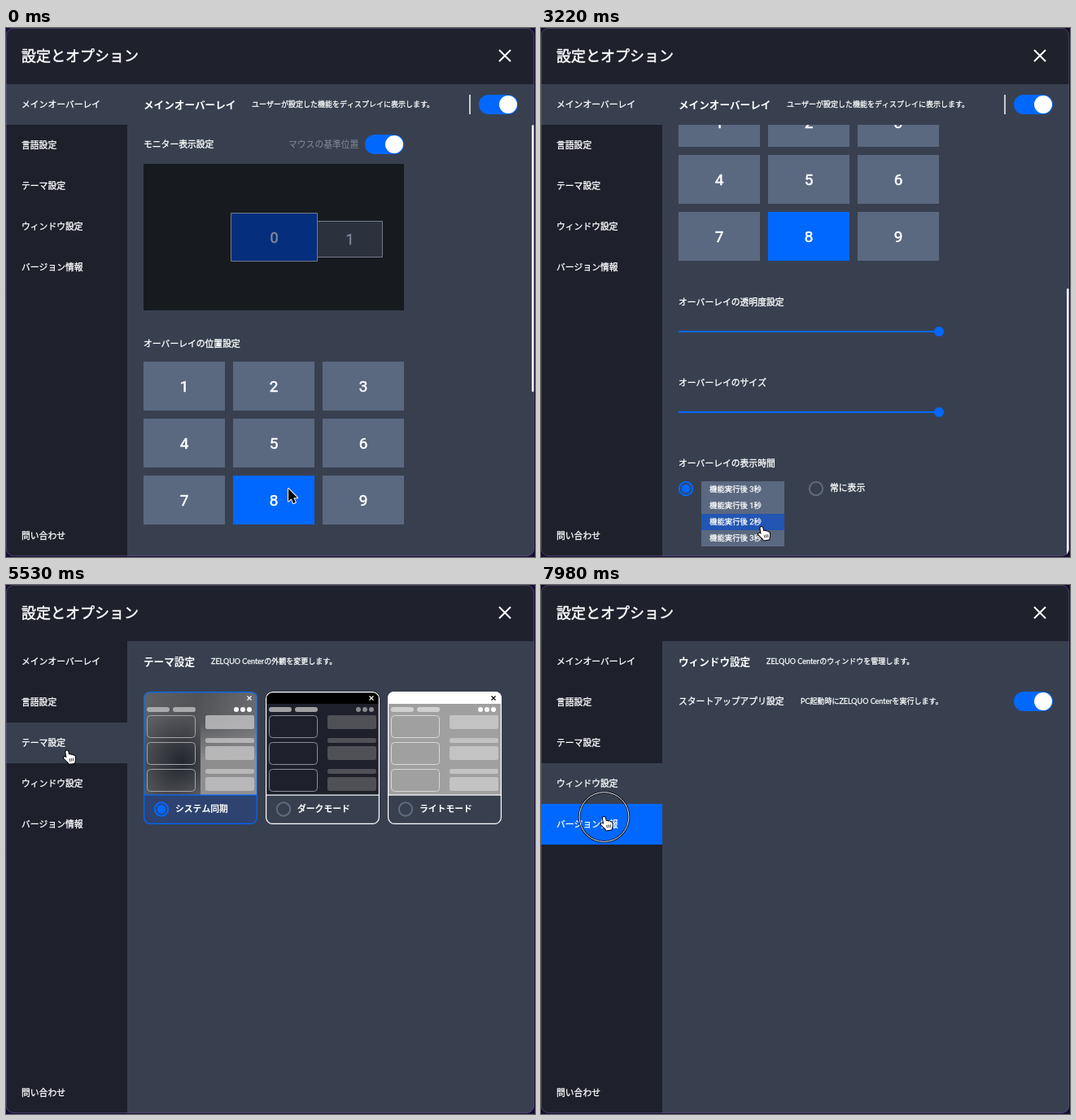
Animation, 650 px wide and 650 px high, one loop 8 s. Source, as an HTML page with a canvas:

```html
<!DOCTYPE html>
<html lang="ja">
<head>
<meta charset="utf-8">
<title>設定とオプション</title>
<style>
html, body { margin: 0; width: 100%; height: 100%; overflow: hidden; background: #190c34; }
canvas { display: block; width: 650px; height: 650px; }
</style>
</head>
<body>
<canvas id="stage" width="650" height="650"></canvas>
<script>
const ctx = document.getElementById('stage').getContext('2d');
const LOOP = 8000, APP = 'ZELQUO Center';
const BLUE = '#0068ff', PANEL = '#384050', SIDE = '#1e202c', TILE = '#5a6980', WHITE = '#fff';
const CJK = '"Noto Sans CJK JP", "Noto Sans CJK", sans-serif';
const MENU = ['メインオーバーレイ', '言語設定', 'テーマ設定', 'ウィンドウ設定', 'バージョン情報'];
const OPTIONS = [3, 1, 2, 3].map(n => `機能実行後 ${n}秒`);

// Cursor moves: start, end, x, y
const MOVES = [
  [70, 210, 364, 500], [890, 1130, 283, 566], [2520, 3080, 271, 613],
  [3230, 3700, 88, 155], [4620, 4830, 75, 201], [5500, 5700, 73, 238], [6980, 7250, 77.5, 285]
];
// Mouse button: down, up
const PRESSES = [[1330, 1450], [3850, 3990], [5180, 5320], [6720, 6860], [7770, 8000]];
// Menu hover: item, enter, leave
const HOVERS = [[1, 3540, 4745], [2, 4745, 5560], [3, 5560, 7080], [4, 7080, 9000]];
const PAGE_TIMES = [4120, 5380, 6900];

const ARROW = new Path2D('M0 0V15.5L3.6 12.3L6.2 18L8.8 16.8L6.3 11.3H11Z');
const HAND = new Path2D('M-1.6 1.3C-1 -.4 1 -.3 1.4 1.2L2.5 5.3C3.4 4.3 4.9 4.6 5.2 5.7C6.2 4.9 7.5 5.3 7.8 6.4' +
  'C8.8 5.9 9.8 6.5 10 7.8C10.4 10.6 10 12.4 9.2 15.6L2.8 16.4C1.5 13.9 -1.5 12 -3.8 9.3C-4.3 7.7 -2.3 7.2 -.4 8.9Z');
const FINGERS = new Path2D('M3.2 9.8L4 13.5M5.4 9.5L6 13.2M7.6 9.2L8 12.8');

const clamp = v => Math.max(0, Math.min(1, v));
const span = (t, a, b) => clamp((t - a) / (b - a));
const ease = p => p * p * (3 - 2 * p);

// A hairline outline gives regular text a medium weight.
function text(s, x, y, size = 10.8, { color = WHITE, bold = false, medium = !bold, face = 'Roboto', align = 'left' } = {}) {
  ctx.font = `${bold ? 700 : 400} ${size}px ${face}, ${CJK}`;
  ctx.fillStyle = ctx.strokeStyle = color;
  ctx.textAlign = align;
  ctx.fillText(s, x, y + size * 0.37);
  if (medium) {
    ctx.lineWidth = size * 0.028;
    ctx.lineJoin = 'round';
    ctx.strokeText(s, x, y + size * 0.37);
  }
}

function rect(x, y, w, h, color) {
  ctx.fillStyle = color;
  ctx.fillRect(x, y, w, h);
}

function paint(fill, stroke, lw) {
  if (fill) { ctx.fillStyle = fill; ctx.fill(); }
  if (stroke) { ctx.strokeStyle = stroke; ctx.lineWidth = lw; ctx.stroke(); }
}

function round(x, y, w, h, r, fill, stroke, lw = 1) {
  ctx.beginPath();
  ctx.roundRect(x, y, w, h, r);
  paint(fill, stroke, lw);
}

function circle(x, y, r, fill, stroke, lw = 1) {
  ctx.beginPath();
  ctx.arc(x, y, r, 0, 7);
  paint(fill, stroke, lw);
}

function cross(x, y, r, color, lw) {
  ctx.beginPath();
  ctx.moveTo(x - r, y - r); ctx.lineTo(x + r, y + r);
  ctx.moveTo(x + r, y - r); ctx.lineTo(x - r, y + r);
  paint(null, color, lw);
}

function toggle(x, y) {
  round(x, y, 48, 24, 12, BLUE);
  circle(x + 36, y + 12, 11, WHITE);
}

function radio(x, y, on) {
  circle(x, y, 8.2, null, on ? BLUE : '#5d6b7c', 2);
  if (on) circle(x, y, 5.6, BLUE);
}

function slider(y) {
  rect(169, y - 1, 320, 2, BLUE);
  circle(489, y, 6, BLUE);
}

function heading(title, desc, x) {
  text(title, 169, 94, 12.6, { bold: true });
  if (desc) text(desc, x, 94, 9, { face: 'Lato' });
}

function cursorAt(t) {
  let x = 347, y = 566;
  for (const [a, b, nx, ny] of MOVES) {
    const p = ease(span(t, a, b));
    x += (nx - x) * p;
    y += (ny - y) * p;
  }
  return { x, y };
}

function monitor(x, y, w, h, fill, label) {
  rect(x, y, w, h, fill);
  ctx.strokeStyle = '#747b87';
  ctx.lineWidth = 1;
  ctx.strokeRect(x + 0.5, y + 0.5, w - 1, h - 1);
  text(label, x + w / 2, y + h / 2, 18, { color: '#80879a', align: 'center' });
}

function dropdown(t, y, mouse) {
  const open = ease(span(t, 1400, 1650)) - ease(span(t, 3920, 4160));
  ctx.save();
  ctx.beginPath();
  ctx.rect(197, y, 102, 20 + 60 * open);
  ctx.clip();
  rect(197, y, 102, 80, TILE);
  const row = Math.floor((mouse.y - 557) / 20);
  if (open > 0.9 && row > 0 && row < 4 && mouse.x > 197 && mouse.x < 299) rect(197, y + 20 * row, 102, 20, '#2255b4');
  OPTIONS.forEach((s, i) => text(s, 207, y + 10 + 20 * i, 9.4));
  ctx.restore();
  if (t < 1400 || t > 3920) {
    ctx.beginPath();
    ctx.moveTo(277, y + 7); ctx.lineTo(289, y + 7); ctx.lineTo(283, y + 13.5);
    paint(WHITE);
  }
}

function overlayPage(t, mouse) {
  const p = ease(span(t, 320, 560));
  ctx.save();
  ctx.beginPath();
  ctx.rect(149, 119, 500, 530);
  ctx.clip();
  ctx.translate(0, -324 * p);
  text('モニター表示設定', 169, 143);
  text('マウスの基準位置', 347, 143, 10.8, { color: '#858b96', medium: false });
  toggle(441, 131);
  rect(169, 167, 320, 180, '#171b20');
  monitor(276, 227, 107, 60, '#052e7d', '0');
  monitor(382, 237, 81, 45, '#2b313d', '1');
  text('オーバーレイの位置設定', 169, 388);
  for (let i = 0; i < 9; i++) {
    const x = 169 + 110 * (i % 3), y = 410 + 70 * Math.floor(i / 3);
    rect(x, y, 100, 60, i === 7 ? BLUE : TILE);
    text(i + 1, x + 50, y + 29.5, 19, { align: 'center' });
  }
  text('オーバーレイの透明度設定', 169, 661);
  slider(697);
  text('オーバーレイのサイズ', 169, 760);
  slider(796);
  text('オーバーレイの表示時間', 169, 859);
  radio(178, 890, true);
  dropdown(t, 881, mouse);
  radio(338, 890, false);
  text('常に表示', 355, 889.5);
  ctx.restore();

  heading(MENU[0], 'ユーザーが設定した機能をディスプレイに表示します。', 302);
  rect(569, 82, 2, 24, '#c9ccd2');
  toggle(581, 82);
  round(646, 119 + 201 * p, 3, 328, 1.5, WHITE);
}

function languagePage() {
  heading(MENU[1]);
  radio(178, 140, false);
  text('한국어', 195, 140, 11.4, { face: '"Noto Sans CJK KR"' });
  radio(251, 140, false);
  text('English', 268, 140, 12.2);
  radio(333, 140, true);
  text('日本語', 350, 140);
}

function systemFill(x) {
  const g = ctx.createLinearGradient(x, 131, x + 140, 175);
  g.addColorStop(0, '#606266');
  g.addColorStop(0.45, '#505256');
  g.addColorStop(1, '#6e6f72');
  rect(x, 131, 140, 128, g);
  const light = ctx.createLinearGradient(0, 170, 0, 258);
  light.addColorStop(0, 'rgba(145,145,146,0)');
  light.addColorStop(0.5, 'rgba(145,145,146,.9)');
  light.addColorStop(1, '#909091');
  rect(x + 70, 170, 70, 88, light);
  const dark = ctx.createRadialGradient(x + 48, 218, 2, x + 40, 215, 55);
  dark.addColorStop(0, '#25282f');
  dark.addColorStop(1, 'rgba(40,43,50,0)');
  rect(x, 160, 70, 98, dark);
}

function themeCard(x, kind, label) {
  const on = kind === 0, light = kind === 2;
  const edge = on ? BLUE : WHITE;
  const pill = ['#a9aaac', '#a0a0a2', '#d0d0d0'][kind];
  const block = ['rgba(195,195,197,.8)', '#505156', '#c3c3c3'][kind];
  const line = ['#a2a4a8', '#8d8f96', '#d8d8d8'][kind];
  ctx.save();
  ctx.beginPath();
  ctx.roundRect(x, 131, 140, 163, 8);
  ctx.clip();
  if (on) systemFill(x);
  else {
    rect(x, 131, 140, 128, light ? '#a0a0a0' : SIDE);
    rect(x, 131, 140, 15, light ? WHITE : '#000');
  }
  rect(x, 258, 140, 36, on ? '#2e4370' : PANEL);
  rect(x, 257.5, 140, 1.2, edge);
  ctx.restore();

  cross(x + 130, 139, 2.5, light ? '#000' : WHITE, 1.2);
  for (const dx of [4, 36]) round(x + dx, 150, 28, 6, 3, pill);
  for (let i = 0; i < 3; i++) {
    circle(x + 114 + 8 * i, 153, 3, kind === 1 ? '#87888c' : WHITE);
    round(x + 4.5, 160.5 + 33 * i, 59, 27, 4, null, line);
  }
  for (const [y, h] of [[160, 17], [188, 6], [198, 17], [226, 6], [236, 17]]) round(x + 76, y, 60, h, 2.5, block);
  round(x + 0.6, 131.6, 138.8, 161.8, 8, null, edge, 1.2);
  radio(x + 22, 275.5, on);
  text(label, x + 39, 275, 10.8, { bold: true });
}

function themePage() {
  heading(MENU[2], `${APP}の外観を変更します。`, 252);
  ['システム同期', 'ダークモード', 'ライトモード'].forEach((s, i) => themeCard(169 + 150 * i, i, s));
}

function windowPage() {
  heading(MENU[3], `${APP}のウィンドウを管理します。`, 277);
  text('スタートアップアプリ設定', 169, 143);
  text(`PC起動時に${APP}を実行します。`, 319, 143, 9, { face: 'Lato' });
  toggle(581, 131);
}

const PAGES = [overlayPage, languagePage, themePage, windowPage];

function sidebar(t, page) {
  rect(0, 69, 149, 580, SIDE);
  for (const [i, a, b] of HOVERS) {
    ctx.globalAlpha = span(t, a, a + 200) - span(t, b, b + 200);
    rect(0, 69 + 50 * i, 149, 50, BLUE);
  }
  ctx.globalAlpha = 1;
  rect(0, 69 + 50 * page, 149, 50, PANEL);
  MENU.forEach((s, i) => text(s, 19, 94 + 50 * i));
  text('問い合わせ', 19, 624);
}

function pressMark(t, { x, y }) {
  for (const [down, up] of PRESSES) {
    if (t < down || t >= up + 105) continue;
    if (t < up) {
      circle(x, y, 30.4, null, 'rgba(10,13,24,.9)', 2.8);
      circle(x, y, 30.4, null, 'rgba(255,255,255,.9)', 1);
    } else {
      circle(x, y, 31 * (1 - (t - up) / 105), 'rgba(125,115,200,.4)');
    }
  }
}

function pointer(t, { x, y }) {
  const hand = t > 1090 && !(t > 3260 && t < 3540);
  const [shape, fill, edge] = hand ? [HAND, WHITE, '#000'] : [ARROW, '#000', WHITE];
  ctx.save();
  ctx.translate(x, y);
  ctx.lineJoin = 'round';
  ctx.lineWidth = 2;
  ctx.strokeStyle = edge;
  ctx.fillStyle = fill;
  ctx.stroke(shape);
  ctx.fill(shape);
  if (hand) {
    ctx.lineWidth = 0.8;
    ctx.stroke(FINGERS);
  }
  ctx.restore();
}

function draw(t) {
  const page = PAGE_TIMES.filter(s => t >= s).length;
  const mouse = cursorAt(t);
  rect(0, 0, 650, 650, '#190c34');
  ctx.save();
  ctx.beginPath();
  ctx.roundRect(0, 0, 649, 649, 9);
  ctx.clip();
  rect(0, 0, 649, 649, PANEL);
  rect(0, 0, 649, 69, '#1f212d');
  sidebar(t, page);
  text('設定とオプション', 19, 34, 18);
  cross(613, 34, 7, WHITE, 2);
  PAGES[page](t, mouse);
  ctx.restore();
  round(0.5, 0.5, 648, 648, 9, null, 'rgba(105,90,150,.5)');
  pressMark(t, mouse);
  pointer(t, mouse);
}

function tick() {
  draw(performance.now() % LOOP);
  requestAnimationFrame(tick);
}
tick();
</script>
</body>
</html>
```
